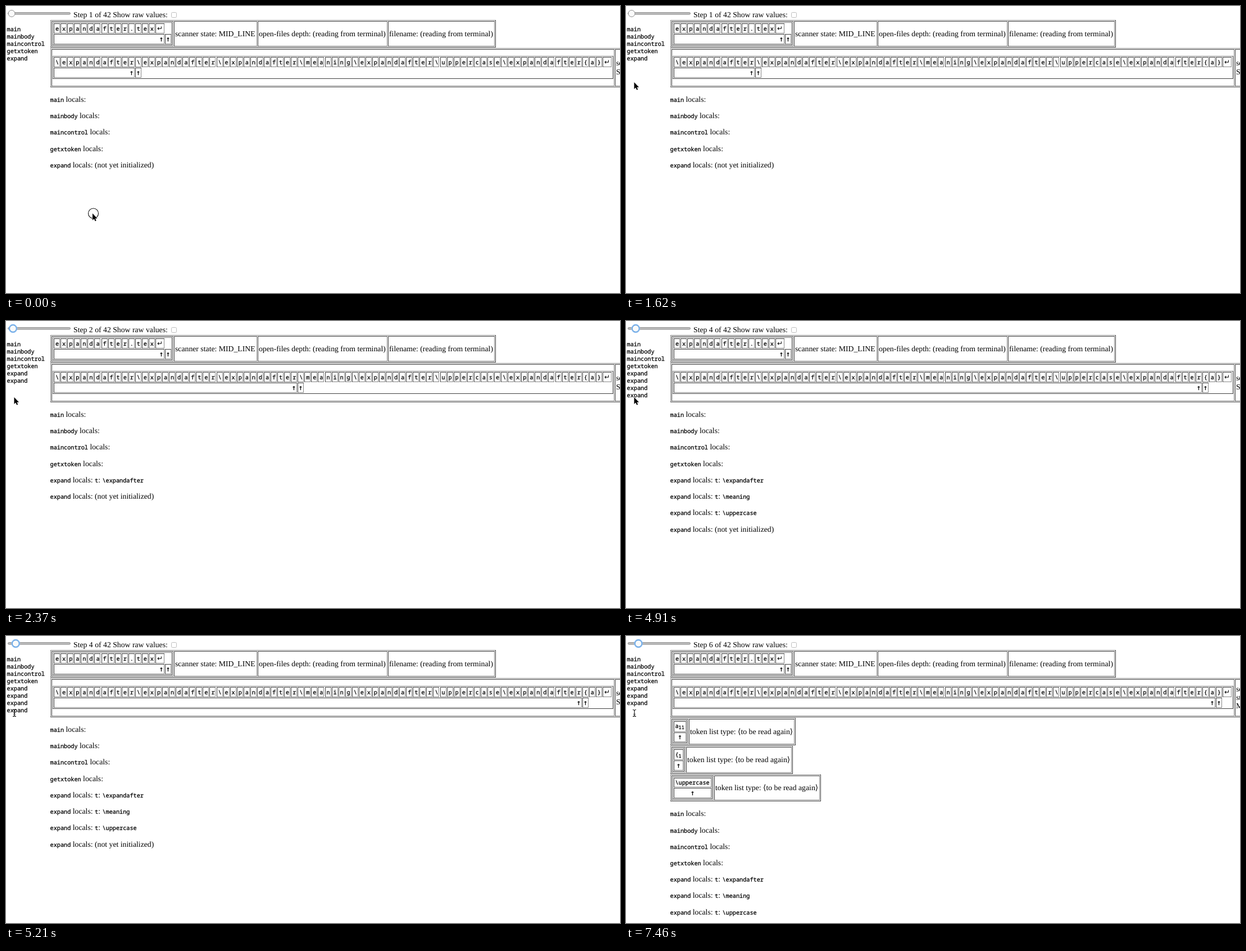
These frames come from a looping animation (1093x512 px, 8 s). An HTML page:

```html
<!DOCTYPE html>
<html lang="en">
<head>
<meta charset="utf-8">
<title>Macro expansion stepper</title>
<style>
html, body { margin: 0; width: 100%; height: 100%; overflow: hidden; background: #fff; }
svg { display: block; width: 1093px; height: 512px; }
text { font: 13.74px "Liberation Serif", "DejaVu Sans", serif; white-space: pre; text-rendering: geometricPrecision; }
.mono { font: 10.22px "Noto Sans Mono", "DejaVu Sans Mono", monospace; stroke: #000; stroke-width: .28; }
.mid { text-anchor: middle; }
.up { font: 12.4px "DejaVu Sans Mono", monospace; stroke: #000; stroke-width: .25; }
.ret { font: 12px "DejaVu Sans", sans-serif; }
.sub { font-size: 8.5px; }
.dark, .light { fill: none; stroke-width: 1; stroke-linecap: square; shape-rendering: crispEdges; }
.dark { stroke: #404040; }
.light { stroke: #888; }
</style>
</head>
<body>
<svg viewBox="0 0 1093 512">
  <g id="scene"></g>
  <circle id="click" r="9" fill="none" stroke="#111" stroke-width="1.1"/>
  <path id="arrow" d="M0 0V12.2L2.8 9.6 4.6 13.8 6.7 12.9 4.9 8.9H8.5Z" fill="#000" stroke="#fff" stroke-width="1.2" paint-order="stroke"/>
  <path id="beam" d="M12 131.5Q15 131.5 15 133.5Q15 131.5 18 131.5M15 133V142M12 143.5Q15 143.5 15 141.5Q15 143.5 18 143.5M13.3 139.5H16.7" fill="none" stroke="#111" stroke-width="1.1"/>
</svg>
<script>
const LOOP = 8000, PITCH = 12.06, LEFT = 85.6;
const $ = id => document.getElementById(id);

const FILE = 'expandafter.tex↵';
const EA = '\\expandafter';
const LINE = EA + EA + EA + '\\meaning' + EA + '\\uppercase' + EA + '{a}↵';
const sub = (s, n) => `${s}<tspan class="sub" dy="2">${n}</tspan>`;
const OPENED = [EA, '\\meaning', '\\uppercase', sub('{', 1)];

// start time, characters consumed, nested expand calls, tokens known
const STEPS = [
  { at: 0, read: 12, calls: 1, known: 0 },
  { at: 2370, read: 36, calls: 2, known: 1 },
  { at: 3720, read: 56, calls: 3, known: 2 },
  { at: 4910, read: 78, calls: 4, known: 3 },
  { at: 6260, read: 80, calls: 4, known: 4, lists: 2, base: 272.7 },
  { at: 7460, read: 80, calls: 3, known: 3, lists: 3, base: 321.3 }
];

// time, x, y of the pointer tip
const POINTER = [
  [0, 154, 370], [450, 72, 69.5], [590, 52, 28.5], [740, 21, 14.5],
  [880, 14, 10.5], [1030, 14.4, 12], [1480, 14, 79.5], [1620, 14.5, 136]
];

let out, dark, light;

const text = (x, y, s, cls = '') => { out += `<text x="${x}" y="${y}" class="${cls}">${s}</text>`; };
const mono = s => `<tspan class="mono">${s}</tspan>`;
const up = (x, y) => text(x, y, '↑', 'up mid');

function box(x1, y1, x2, y2, raised) {
  const [l, t, r, b] = [x1, y1, x2, y2].map(v => v + .5);
  const topLeft = `M${l} ${b}V${t}H${r}`, bottomRight = `M${r} ${t}V${b}H${l}`;
  if (raised) { light += topLeft; dark += bottomRight; }
  else { dark += topLeft; light += bottomRight; }
}

function buffer(chars, y, read) {
  const left = i => Math.floor(LEFT + PITCH * i);
  [...chars].forEach((c, i) => {
    const x = left(i), ret = c === '↵';
    box(x, y, x + (ret ? 15 : 10), y + 17);
    text(ret ? x + 8 : LEFT + PITCH * i + 5.5, y + (ret ? 13 : 12.5), c, ret ? 'ret mid' : 'mono mid');
  });
  const next = read < chars.length ? left(read) : left(read - 1) + 17;
  box(85, y + 19, next - 2, y + 36);
  up(next - 6.5, y + 31.7);
  box(next, y + 19, next + 10, y + 36);
  up(next + 5.6, y + 31.7);
}

function tokenList(top, mid, bottom, right, baseline, token) {
  const x = right + 8;
  box(79, top, x + 187, bottom, true);
  box(81, top + 2, right + 4, bottom - 2);
  box(83, top + 4, right + 2, bottom - 4, true);
  box(85, top + 6, right, mid);
  box(85, mid + 2, right, bottom - 6);
  box(x - 2, top + 2, x + 185, bottom - 2);
  text(87.4, baseline, token, 'mono');
  up((85 + right + 1) / 2, (mid + bottom) / 2 + 2.2);
  text(x, (top + bottom) / 2 + 4.5, 'token list type: ⟨to be read again⟩');
}

function slider(n) {
  const x = 10 + 2.42 * n;
  out += '<rect x="3.5" y="11.5" width="111" height="3.6" rx="1.8" fill="#bcbcbc" stroke="#8c8c8c" stroke-width=".9"/>';
  if (n) out += `<circle cx="${x}" cy="13.4" r="6.6" fill="#fff" stroke="#8dbdf0" stroke-width="2.4"/>`;
  out += `<circle cx="${x}" cy="13.4" r="5.9" fill="#fafafa" stroke="${n ? '#4a93dc' : '#909090'}"/>`;
  text(120, 20, `Step ${n + 1} of 42 Show raw values:`);
  out += '<rect x="294.5" y="11.5" width="9" height="9" rx="2" fill="#fff" stroke="#bdbdbd"/>';
}

function fileTable() {
  box(79, 25, 871, 73, true);
  box(81, 27, 297, 71);
  box(83, 29, 295, 69, true);
  buffer(FILE, 31, FILE.length);
  const cells = [
    [299, 446, 'scanner state: MID_LINE'],
    [448, 678, 'open-files depth: (reading from terminal)'],
    [680, 869, 'filename: (reading from terminal)']
  ];
  for (const [l, r, s] of cells) {
    box(l, 27, r, 71);
    text(l + 2, 53.7, s);
  }
}

function lineTable(step) {
  box(79, 75, 1300, 144, true);
  box(81, 77, 1082, 142);
  box(83, 89, 1080, 129, true);
  buffer(LINE, 91, step.read);
  box(1084, 77, 1180, 142);
  const words = step.lists ? ['scanner', 'state:', 'MID_LINE'] : ['scanner state:', 'SKIP_BLANKS'];
  words.forEach((w, i) => text(1086, 114 + 15.45 * (i - (words.length - 1) / 2), w));
}

function scene(n) {
  const step = STEPS[n];
  out = dark = light = '';
  slider(n);
  fileTable();
  lineTable(step);
  if (step.lists > 1) {
    tokenList(146, 170, 194, 106, 163.5, sub('a', 11));
    tokenList(196, 220, 245, 101, 214.5, sub('{', 1));
  }
  if (step.lists > 2) tokenList(247, 269, 294, 151, 264.5, '\\uppercase');

  const outer = ['main', 'mainbody', 'maincontrol', 'getxtoken'];
  const stack = outer.concat(Array(step.calls).fill('expand'));
  stack.forEach((name, i) => {
    text(1.5, 45 + 12.95 * i, name, 'mono');
    const k = i - outer.length;
    let locals = '';
    if (k >= 0) locals = k < step.known ? ` ${mono('t')}: ${mono(OPENED[k])}` : ' (not yet initialized)';
    text(78.5, (step.base || 171) + 29.22 * i, `${mono(name)} locals:${locals}`);
  });
  return `<path class="light" d="${light}"/><path class="dark" d="${dark}"/>${out}`;
}

const scenes = STEPS.map((_, n) => scene(n));
const show = (id, on) => { $(id).style.display = on ? '' : 'none'; };
let shown = -1;

function draw(now) {
  const t = now % LOOP;
  const n = STEPS.findLastIndex(s => t >= s.at);
  if (n !== shown) $('scene').innerHTML = scenes[shown = n];

  const [, x, y] = POINTER.findLast(p => t >= p[0]);
  $('arrow').setAttribute('transform', `translate(${x} ${y})`);
  $('click').setAttribute('cx', x + 1.5);
  $('click').setAttribute('cy', y);
  show('click', t < 150 || (t >= 1180 && t < 1330));
  show('arrow', t < 5210);
  show('beam', t >= 5210);
}

function tick() {
  draw(performance.now());
  requestAnimationFrame(tick);
}
tick();
</script>
</body>
</html>
```
